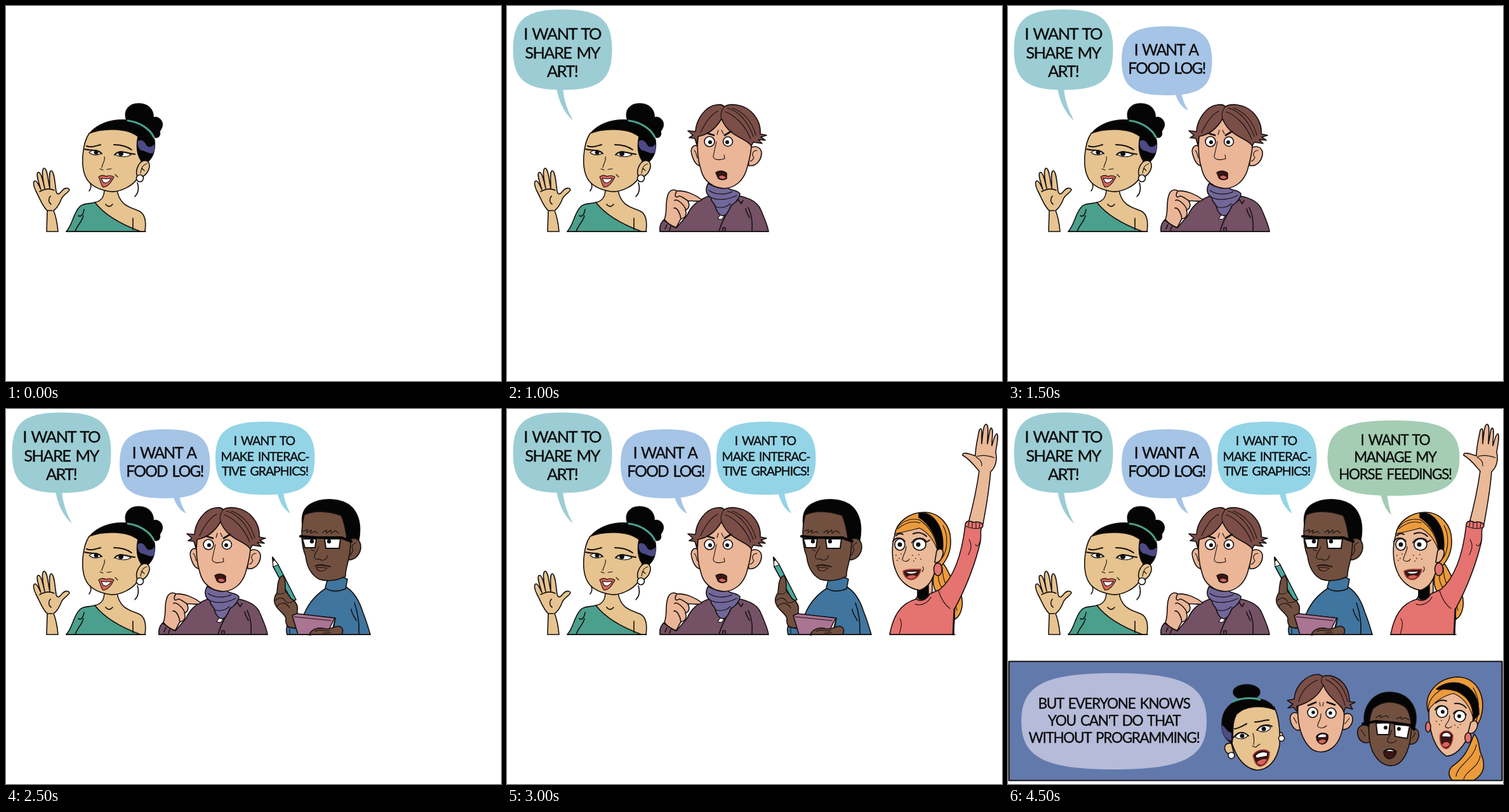
These frames come from a looping animation (780 px wide and 592 px high, 5 s). An HTML page:

```html
<!DOCTYPE html>
<html lang="en">
<head>
<meta charset="utf-8">
<title>Everyone wants something</title>
<style>
html, body { margin: 0; width: 100%; height: 100%; overflow: hidden; background: #fff; }
svg { display: block; width: 780px; height: 592px; stroke: #15100f; stroke-width: 1.6; stroke-linejoin: round; stroke-linecap: round; fill: none; }
text { font-family: Lato, "Open Sans", sans-serif; text-anchor: middle; word-spacing: 3px; fill: #0b0b0b; stroke: #0b0b0b; stroke-width: .35; }
.w { fill: #fff; }
.k { fill: #050505; }
.dot { fill: #111; stroke: none; }
.m { stroke-width: 2; }
.b { stroke-width: 2.8; }
.t { stroke-width: 1.1; }
.frame { stroke: #050505; stroke-width: 4.2; }
.band { stroke: #4aa08c; stroke-width: 3; }
.freckle { stroke: #6d3a28; stroke-width: 2; }
.tan { fill: #e6c38f; }
.pink { fill: #ebb597; }
.brown { fill: #725040; }
.peach { fill: #eab997; }
.teal { fill: #4aa08c; }
.hair { fill: #7b4e48; }
.coat { fill: #745165; }
.scarf { fill: #716799; }
.blue { fill: #3f759f; }
.gold { fill: #eb9b3c; }
.coral { fill: #e5736f; }
.lip { fill: #d8645b; }
.mouth { fill: #3b1614; }
.red { stroke: #a83a36; stroke-width: 1.7; }
.shine { fill: #4d4a86; stroke: none; }
</style>
</head>
<body>
<svg viewBox="0 0 780 592">
  <!-- woman with bun -->
  <g data-at="0">
    <path class="tan" d="M64 356L65 323C57 316 54 305 47 292C43 284 42 276 46 276C50 277 52 284 55 290C52 280 47 266 50 263C55 260 58 276 61 288C58 274 55 258 60 256C65 256 66 274 69 288C69 276 67 262 71 260C76 260 77 278 79 293C81 299 84 297 88 292C92 287 98 286 100 290C98 295 92 297 88 303C85 311 82 318 75 323C80 335 81 346 82 356Z"/>
    <path d="M53 293C62 288 70 288 76 291M70 300C66 305 67 310 71 313M65 323L73 323"/>
    <path class="k" d="M190 181C184 164 195 154 209 154C224 154 233 164 232 176C241 174 248 182 246 190C245 194 243 196 242 198C244 205 239 209 234 207Z"/>
    <path class="k" d="M131 202C142 187 165 178 190 180C211 183 229 195 234 212C236 230 231 240 222 247L208 250Z"/>
    <path class="shine" d="M207 214C213 209 218 213 222 221C226 224 231 222 234 218C235 224 234 229 232 232C224 234 219 228 213 228C209 226 207 220 207 214Z"/>
    <path class="band" d="M192 181C210 183 227 194 233 207"/>
    <path class="tan" d="M155 289C155 302 150 308 140 310L160 336L205 356H219C221 342 219 330 212 325C200 318 179 318 175 290Z"/>
    <path class="tan" d="M131 201C150 193 190 191 208 206C205 222 207 236 213 244L207 272C200 284 180 294 165 293C150 291 138 286 130 277C121 266 120 250 121 236C122 222 125 210 131 201Z"/>
    <path class="tan" d="M212 247C218 241 227 244 226 254C224 264 217 270 210 271C203 268 205 254 212 247Z"/>
    <path class="t" d="M222 249C214 251 213 258 212 264M214 256L218 260"/>
    <path d="M207 279C210 288 208 296 203 301M133 280C135 286 133 289 131 292"/>
    <circle class="w" cx="211" cy="272" r="5.5"/>
    <path class="m" d="M127 221C134 224 141 221 149 219M170 219C179 219 190 221 198 227"/>
    <path class="w t" d="M131 231C137 226 145 227 150 233C143 236 136 236 131 231ZM172 235C177 228 190 229 197 235C190 239 180 239 172 235Z"/>
    <path class="m" d="M124 226C134 229 144 225 151 233M171 235C178 226 188 232 203 234"/>
    <circle class="dot" cx="142" cy="231" r="3.5"/><circle class="dot" cx="181" cy="233" r="4"/>
    <path class="t" d="M155 238C157 245 151 250 151 255M148 257L153 259M159 258L166 257M172 266L176 270"/>
    <path class="lip t" d="M146 270C150 266 154 267 158 269C162 267 167 268 170 270C166 278 160 286 153 286C149 282 149 275 146 270Z"/>
    <path class="w t" d="M150 272L158 273L166 272C163 278 157 281 153 278Z"/>
    <path class="teal" d="M140 310C130 313 120 311 115 318C105 330 105 345 95 356H212C185 346 157 332 140 310Z"/>
    <path d="M123 321C122 329 118 334 114 331M122 331C119 342 112 346 109 356M157 313C160 317 164 318 168 313M200 335L200 353M95 356H220"/>
  </g>

  <!-- man with scarf -->
  <g data-at="1000">
    <path class="coat" d="M241 356C240 346 244 340 248 337L267 350L284 330C290 316 300 307 318 300L352 298C375 300 394 306 400 322C407 338 411 348 412 356Z"/>
    <path class="w t" d="M332 336L337 328L343 331L338 337Z"/>
    <path d="M353 315C346 328 339 338 334 356"/>
    <path class="pink" d="M301 222C295 217 288 224 291 234C294 245 299 253 306 252ZM379 229C385 219 398 220 401 230C402 242 393 254 381 252Z"/>
    <path class="t" d="M394 228C387 228 385 235 389 239C387 244 385 245 383 245M295 228C299 231 298 236 300 240"/>
    <path class="scarf" d="M317 280C312 289 313 298 322 303C320 309 328 311 329 319C331 326 336 332 342 331C349 328 350 320 353 315C360 311 367 303 367 296C360 289 351 292 347 286C335 288 325 285 317 280Z"/>
    <path class="t" d="M318 291C330 300 348 297 355 293M323 303C334 308 350 305 362 299M329 317C338 320 347 317 352 312"/>
    <path class="pink" d="M301 205C299 225 301 245 306 260C310 276 325 288 343 288C360 287 372 275 377 260C383 240 386 220 385 210L338 178Z"/>
    <path class="hair" d="M338 178C330 192 317 203 301 206L299 219L296 209L287 208L293 204L285 197L297 198C298 180 312 158 330 156C337 155 341 157 342 159C352 153 372 155 385 167C396 178 400 190 399 202L409 204L400 207L407 212L396 211L402 217L388 215L385 221C378 208 350 208 338 178Z"/>
    <path class="t" d="M342 159C337 166 336 172 338 178M344 167C358 172 375 187 384 210M332 166C320 172 312 185 305 200M355 161C375 168 387 185 392 204M347 161C365 166 380 182 388 206"/>
    <circle class="w" cx="319" cy="214" r="8"/><circle class="w" cx="348" cy="214" r="7.5"/>
    <circle class="dot" cx="320" cy="215" r="3"/><circle class="dot" cx="347" cy="215" r="3"/>
    <path class="b" d="M316 201L326 204M343 204L353 198"/>
    <path class="t" d="M333 196L331 203M338 196L341 202M330 214L325 237C325 243 334 244 343 241L342 235"/>
    <path class="mouth" d="M329 263C334 259 342 260 346 264L346 272C342 276 333 274 332 270Z"/>
    <path class="lip t" d="M333 270C337 265 343 267 346 271C342 275 336 274 333 270Z"/>
    <path class="pink" d="M248 337C253 324 249 312 253 300C255 291 262 288 268 292C282 291 297 298 307 306C302 311 293 306 285 308C289 315 286 321 281 322C284 329 281 335 274 336C270 342 269 347 266 350C258 347 253 343 248 337Z"/>
    <path d="M267 293C263 300 266 304 271 300C275 300 281 305 286 308M264 307C268 304 279 313 282 322M263 319C268 318 273 327 274 336M247 338C253 343 260 347 267 350M252 345L249 352M258 348L256 354"/>
    <path d="M380 318C386 330 387 345 386 356M376 320C377 327 380 329 382 334M361 309L364 305L369 312L372 307M340 356V350H344V356M241 356H412"/>
  </g>

  <!-- man with glasses -->
  <g data-at="2000">
    <path class="blue" d="M443 342C441 349 442 353 443 356H574C570 342 567 332 562 320C558 307 550 290 536 281L504 283C490 292 478 304 470 323L460 340Z"/>
    <path class="blue" d="M507 268C515 263 530 263 538 269L535 284C520 290 508 287 503 282Z"/>
    <path class="k" d="M467 182C465 166 470 156 480 150C500 139 530 141 545 155C557 168 560 185 556 207L538 210Z"/>
    <path class="brown" d="M541 207C550 200 560 207 559 220C557 232 548 239 539 238Z"/>
    <path class="t" d="M552 211C545 213 544 219 547 222C545 228 544 230 542 231"/>
    <path class="brown" d="M470 167C464 190 465 214 472 232C474 248 480 262 494 269C508 273 524 270 535 264C534 250 543 240 543 208L537 204C535 192 534 180 528 168C508 161 488 159 470 167Z"/>
    <path class="w" d="M467 205H489L487 219H471ZM502 205H527L525 220H504Z" stroke-width="2"/>
    <path class="frame" d="M464 201L490 203L502 203L528 203L544 209"/>
    <circle class="dot" cx="482" cy="209" r="3.2"/><circle class="dot" cx="509" cy="209" r="3.2"/>
    <path class="t" d="M468 193L475 190L474 195L481 191L480 196L488 193L490 196M499 195L505 191L505 196L512 191L512 196L519 192L524 196M493 217C491 226 484 229 486 235C490 240 494 234 497 239C502 239 507 236 506 231M481 222L486 224"/>
    <path d="M487 248C494 244 503 247 511 249" fill="#55352b"/>
    <path class="t" d="M489 250C491 257 500 258 506 251Z" fill="#85503f"/>
    <path fill="#4ba9a0" d="M420 234L429 246L457 301L451 304L421 249Z"/>
    <path class="w t" d="M420 234L429 246L421 249Z"/><path class="k" d="M420 234L423 238L421 240Z"/>
    <path class="brown" d="M436 263C428 266 428 280 427 290C422 297 422 303 424 308C428 318 438 322 441 330C440 338 442 342 446 345L460 346C455 332 460 325 459 318C461 309 455 303 449 299C446 295 444 290 440 288C440 278 441 268 436 263Z"/>
    <path class="t" d="M427 292C432 291 435 294 438 290M425 302C431 296 438 298 441 305M427 311C434 304 442 306 447 314M441 305C447 307 453 304 454 302M443 342C449 346 455 347 460 346M447 347V355"/>
    <path class="w" d="M458 324L519 330L514 350L478 357Z"/>
    <path fill="#aa7493" d="M451 326L458 323L518 330L508 350L484 356H460Z"/>
    <path class="t" d="M519 331L516 350M454 328L512 334"/>
    <path class="brown" d="M478 356C482 347 493 344 503 347C512 349 518 342 525 343C531 345 532 350 529 356Z"/>
    <path class="t" d="M487 351C495 346 503 352 510 350M500 354L511 353"/>
    <path d="M549 306C555 323 557 340 556 356M544 316C545 325 550 329 552 334M443 356H574"/>
  </g>

  <!-- woman with raised arm -->
  <g data-at="3000">
    <path class="gold" d="M680 238C697 248 698 274 712 284C722 304 717 325 706 332C703 312 690 300 680 293C667 280 670 262 680 238Z"/>
    <path class="t" d="M686 250C686 280 703 290 709 318M681 258C676 272 686 284 695 295"/>
    <path class="peach" d="M727 180C735 150 741 120 744 98C735 88 730 80 718 73C717 66 732 72 738 74C738 60 742 45 744 34C747 28 749 32 748 42L748 55C750 40 750 25 755 24C760 25 757 42 757 55C760 42 760 30 763 30C767 32 764 45 764 58C767 50 768 40 772 39C775 42 772 55 770 68C773 80 770 92 762 99C760 125 756 150 750 182Z"/>
    <path class="t" d="M740 75C749 72 760 74 768 77M739 76C745 79 749 84 748 90"/>
    <path class="peach" d="M646 280C649 292 648 296 643 301C655 312 667 300 670 288V262Z"/>
    <path class="k" d="M647 284L664 278V296C659 303 651 302 647 298Z"/>
    <path class="coral" d="M603 356C608 330 618 307 645 300C652 305 661 301 666 292L682 285C702 268 716 235 722 184C722 177 728 175 735 179C742 177 750 179 750 185C744 190 748 198 746 209C738 245 722 285 705 316L704 356Z"/>
    <path class="t" d="M723 185C732 189 741 190 749 187M728 178L727 185M733 179L733 187M739 179L739 188M745 180L744 188M738 214C742 220 744 212 746 208M728 206C734 216 730 224 727 230M680 287C684 300 691 310 698 315M619 331C624 338 620 348 618 356M643 308C653 312 664 305 668 297"/>
    <path class="b" d="M705 316L703 356"/>
    <path class="gold" d="M611 198C614 178 635 163 657 163C682 163 699 184 699 207C700 225 692 240 684 248L674 238L655 184C642 190 625 194 611 198Z"/>
    <path class="peach" d="M612 196C605 215 606 240 613 256C620 274 635 284 650 286C665 282 672 268 676 250C682 225 678 205 660 186C645 188 628 192 612 196Z"/>
    <path class="gold t" d="M611 197C615 180 633 171 650 175C664 185 676 200 678 222C672 206 664 195 650 188C638 191 623 195 611 197Z"/>
    <path class="t" d="M616 189C628 179 640 176 651 180M687 184C696 200 694 222 686 235"/>
    <path class="k" d="M649 164C672 162 691 187 686 226L678 223C679 204 666 181 649 171Z"/>
    <path class="peach" d="M677 224C683 217 690 223 686 232C684 240 678 244 674 242Z"/>
    <ellipse class="coral" cx="679" cy="253" rx="6.5" ry="10"/>
    <ellipse class="w" cx="619" cy="214" rx="8" ry="9"/><ellipse class="w" cx="650" cy="214" rx="10" ry="9"/>
    <circle class="dot" cx="619" cy="214" r="3.5"/><circle class="dot" cx="648" cy="214" r="3.5"/>
    <path class="m" d="M608 209C612 202 622 202 627 209M638 211C643 202 656 202 661 210L666 207M613 200C616 196 621 196 624 198M640 197C648 193 656 196 661 201"/>
    <path class="freckle" d="M613 231h0M618 236h0M621 229h0M615 239h0M639 231h0M644 236h0M649 230h0M641 240h0M652 237h0"/>
    <path class="t" d="M629 217C629 226 623 232 623 238C626 242 632 241 634 237M655 249C657 252 656 255 654 257"/>
    <path class="mouth red" d="M624 256C632 251 645 254 652 253C650 264 642 271 634 269C628 267 625 262 624 256Z"/>
    <path class="w t" d="M628 257L648 256C644 261 632 262 628 257Z"/>
    <path class="lip" stroke="none" d="M630 265C635 262 641 262 645 264C640 269 634 269 630 265Z"/>
    <path d="M603 356H706"/>
  </g>

  <!-- closing panel -->
  <g data-at="4500" id="panel">
    <rect x="1.5" y="398.5" width="777" height="188" fill="#6279ac" stroke-width="2.2"/>
    <g>
      <ellipse class="k" cx="376" cy="447" rx="21" ry="12"/>
      <path class="tan" d="M352 528C342 526 338 535 345 543L357 548ZM426 512C433 507 435 515 430 523Z"/>
      <path class="tan" d="M356 480C345 505 350 525 360 545C368 560 380 569 392 570C410 570 424 555 428 530C429 505 427 485 419 470C400 462 370 464 356 480Z"/>
      <path class="k" d="M337 500C336 474 352 460 375 457C398 455 414 460 421 475C400 467 374 468 360 482C352 495 356 512 353 528C342 521 337 512 337 500Z"/>
      <path class="shine" d="M337 499C343 502 345 510 352 511L352 524C342 522 336 510 337 499Z"/>
      <path class="band" d="M354 462C366 456 384 455 397 459"/>
      <circle class="w" cx="352" cy="547" r="5"/><circle class="w" cx="431" cy="520" r="4.5"/>
      <path class="w t" d="M358 518C363 509 373 509 378 516C372 522 364 522 358 518ZM393 507C398 499 408 498 414 503C410 511 400 511 393 507Z"/>
      <path class="m" d="M355 519C362 509 371 508 379 516M392 507C398 498 408 497 416 501M357 505C364 504 370 500 376 497M389 494C397 494 404 491 411 491"/>
      <circle class="dot" cx="369" cy="516" r="3.5"/><circle class="dot" cx="403" cy="505" r="3.5"/>
      <path class="t" d="M386 512C388 520 388 526 387 530M385 532L390 534L397 529"/>
      <path class="mouth red" d="M386 547C391 538 405 535 412 542C412 555 405 564 396 564C389 561 388 553 386 547Z"/>
      <path class="w t" d="M390 547C396 541 404 540 409 543L408 548L391 551Z"/>
      <path class="lip" stroke="none" d="M392 558C396 553 404 552 408 553C404 563 396 564 392 558Z"/>
    </g>
    <g>
      <path class="pink" d="M457 481C449 476 443 483 445 492C447 502 454 510 461 506ZM527 484C536 477 544 482 543 492C541 502 533 508 525 505Z"/>
      <path class="t" d="M450 487L455 496M538 488L531 497"/>
      <path class="pink" d="M457 468C455 495 462 525 480 538C495 546 515 540 524 516C530 500 531 480 528 468L497 436Z"/>
      <path class="hair" d="M497 436C490 452 475 464 455 469L456 478L450 471L441 472L449 466L440 460L451 458C452 438 470 418 490 419L496 422C515 417 538 432 538 462L547 463L539 467L543 474L532 471L529 478C526 465 505 458 497 436Z"/>
      <path class="t" d="M496 422C492 428 493 432 497 436M488 428C472 434 462 447 458 462M501 427C517 435 527 450 531 468M510 425C524 433 532 446 535 462"/>
      <circle class="w" cx="480" cy="479" r="8"/><circle class="w" cx="509" cy="480" r="8"/>
      <circle class="dot" cx="481" cy="479" r="2.8"/><circle class="dot" cx="508" cy="480" r="2.8"/>
      <path class="b" d="M473 468L485 463M503 463L515 467"/>
      <path class="t" d="M491 463L492 469M497 463L496 469M493 481C494 491 487 496 488 501C491 505 498 504 502 500"/>
      <path class="mouth" d="M486 517C490 511 500 510 504 515C505 523 501 529 494 529C488 527 486 522 486 517Z"/>
      <path class="w t" d="M488 516C493 512 499 512 502 515L501 518L489 519Z"/>
      <path class="lip" stroke="none" d="M489 525C493 521 499 521 501 524C498 529 492 529 489 525Z"/>
    </g>
    <g>
      <path class="k" d="M562 500C557 470 575 448 600 447C632 447 649 472 641 503L632 508L570 502Z"/>
      <path class="brown" d="M568 501C557 495 549 503 551 514C553 525 563 530 571 525ZM633 506C642 500 649 508 647 518C644 528 637 531 631 528Z"/>
      <path class="t" d="M556 506L563 516M642 511L637 520"/>
      <path class="brown" d="M575 473C567 490 565 528 578 547C588 562 602 567 615 560C630 550 637 520 635 496C634 483 631 474 624 469C608 460 590 460 575 473Z"/>
      <path class="w" d="M580 496L602 495L600 514L582 514ZM609 498L633 500L629 520L610 517Z" stroke-width="2"/>
      <path class="frame" d="M559 497L580 493L605 495L634 499L640 506"/>
      <circle class="dot" cx="595" cy="503" r="3"/><circle class="dot" cx="616" cy="505" r="3"/>
      <path class="t" d="M580 487L587 483L587 487L596 484L600 487M612 489L619 486L620 490L626 487L632 491M604 507C604 516 597 519 598 525C603 529 609 527 612 523"/>
      <path class="mouth" d="M592 541C597 535 607 535 612 541C610 549 605 553 599 552C594 550 592 546 592 541Z"/>
      <path class="w t" d="M595 540C600 536 606 537 609 541Z"/>
    </g>
    <g>
      <path class="gold" d="M735 513C727 530 724 548 700 564C691 573 696 582 700 586H734C752 576 752 560 746 546C741 536 744 524 735 513Z"/>
      <path class="t" d="M738 530C734 553 708 562 706 580M744 547C742 567 720 571 718 585"/>
      <path class="gold" d="M662 478C654 450 676 425 708 423C742 424 755 458 744 490L733 512L724 500Z"/>
      <path class="t" d="M733 440C744 458 743 478 737 496"/>
      <path class="peach" d="M664 470C660 500 671 536 691 548C710 547 726 523 732 496C736 470 730 452 708 442C692 447 674 456 664 470Z"/>
      <path class="gold t" d="M662 476C661 456 680 439 702 438C722 445 734 463 733 488C727 467 717 455 702 449C685 453 672 462 662 476Z"/>
      <path class="k" d="M675 442C700 422 743 431 742 482L733 492C735 461 715 438 678 443Z"/>
      <path class="peach" d="M729 495C736 489 742 494 739 503C736 511 730 514 725 511Z"/>
      <ellipse class="coral" cx="662" cy="502" rx="4" ry="8"/><ellipse class="coral" cx="725" cy="519" rx="5" ry="8"/>
      <ellipse class="w" cx="684" cy="478" rx="9" ry="9"/><ellipse class="w" cx="712" cy="485" rx="9" ry="9"/>
      <circle class="dot" cx="685" cy="478" r="3"/><circle class="dot" cx="711" cy="485" r="3"/>
      <path class="m" d="M673 475C677 467 688 466 693 474M702 481C706 474 717 474 722 483M674 464C680 459 686 459 691 461M704 465C712 464 718 467 722 472"/>
      <path class="freckle" d="M675 493h0M680 498h0M683 492h0M704 499h0M709 503h0M713 498h0"/>
      <path class="t" d="M696 484C696 494 690 496 689 501C691 505 697 504 699 501"/>
      <path class="mouth red" d="M681 514C686 506 696 506 701 515C701 528 695 537 689 536C682 533 680 524 681 514Z"/>
      <path class="w t" d="M684 514C688 509 695 510 698 515L697 518L684 517Z"/>
      <path class="lip" stroke="none" d="M684 530C688 524 694 525 696 529C693 535 687 535 684 530Z"/>
    </g>
  </g>
</svg>
<script>
const LOOP = 5000;
const svg = document.querySelector("svg");

// box: x, y, w, h; tail: two base points and a tip; lines: text, centre, baseline
const bubbles = [
  { at: 500, fill: "#9ccdd4", box: [9.5, 5.5, 156, 127], tail: [78, 130, 88, 130, 104, 181], size: 25.5, gap: -1.6,
    lines: [["I WANT TO", 87, 53], ["SHARE MY", 87, 83], ["ART!", 87, 112]] },
  { at: 1500, fill: "#a5c4e6", box: [179, 32, 142.5, 109], tail: [263, 136, 273, 136, 284, 165], size: 24.5, gap: -1.7,
    lines: [["I WANT A", 249, 78], ["FOOD LOG!", 250, 107]] },
  { at: 2500, fill: "#94d4e7", box: [330, 20, 156.5, 115.5], tail: [427, 131, 437, 131, 448, 165], size: 19.5, gap: -1,
    lines: [["I WANT TO", 407, 57], ["MAKE INTERAC-", 408, 82], ["TIVE GRAPHICS!", 408, 105]] },
  { at: 3500, fill: "#a4cdb3", box: [503.5, 18, 208, 119], tail: [587, 134, 597, 134, 604, 167], size: 22.5, gap: -1.3,
    lines: [["I WANT TO", 610, 57], ["MANAGE MY", 610, 84], ["HORSE FEEDINGS!", 610, 111]] },
  { parent: "panel", fill: "#b5bbd8", box: [21, 417, 292, 152], size: 22.5, gap: -1.3,
    lines: [["BUT EVERYONE KNOWS", 167, 473], ["YOU CAN'T DO THAT", 167, 500], ["WITHOUT PROGRAMMING!", 167, 527]] }
];

function add(parent, tag, attrs, text = "") {
  const el = document.createElementNS(svg.namespaceURI, tag);
  for (const key in attrs) el.setAttribute(key, attrs[key]);
  el.textContent = text;
  return parent.appendChild(el);
}

function blob([x, y, w, h]) {
  const cx = x + w / 2, cy = y + h / 2, kx = w * .375, ky = h * .375, r = x + w, b = y + h;
  return `M${x} ${cy}C${x} ${cy - ky} ${cx - kx} ${y} ${cx} ${y}S${r} ${cy - ky} ${r} ${cy}` +
    `S${cx + kx} ${b} ${cx} ${b}S${x} ${cy + ky} ${x} ${cy}Z`;
}

function spike([x1, y1, x2, y2, tx, ty]) {
  const my = (y1 + ty) / 2;
  return `M${x1} ${y1}Q${x1 + 6} ${my + 8} ${tx} ${ty}Q${x2 + 2} ${my} ${x2} ${y2}Z`;
}

for (const { at, parent, fill, box, tail, size, gap, lines } of bubbles) {
  const g = parent ? document.getElementById(parent) : add(svg, "g", { "data-at": at });
  add(g, "path", { d: blob(box), fill, stroke: "none" });
  if (tail) add(g, "path", { d: spike(tail), fill, stroke: "none" });
  for (const [text, x, y] of lines)
    add(g, "text", { x, y, "font-size": size, "letter-spacing": gap }, text);
}

for (const g of svg.querySelectorAll("[data-at]")) {
  const offset = g.dataset.at / LOOP;
  if (offset) g.animate([
    { opacity: 0, offset: 0 }, { opacity: 0, offset },
    { opacity: 1, offset }, { opacity: 1, offset: 1 }
  ], { duration: LOOP, iterations: Infinity });
}
</script>
</body>
</html>
```
